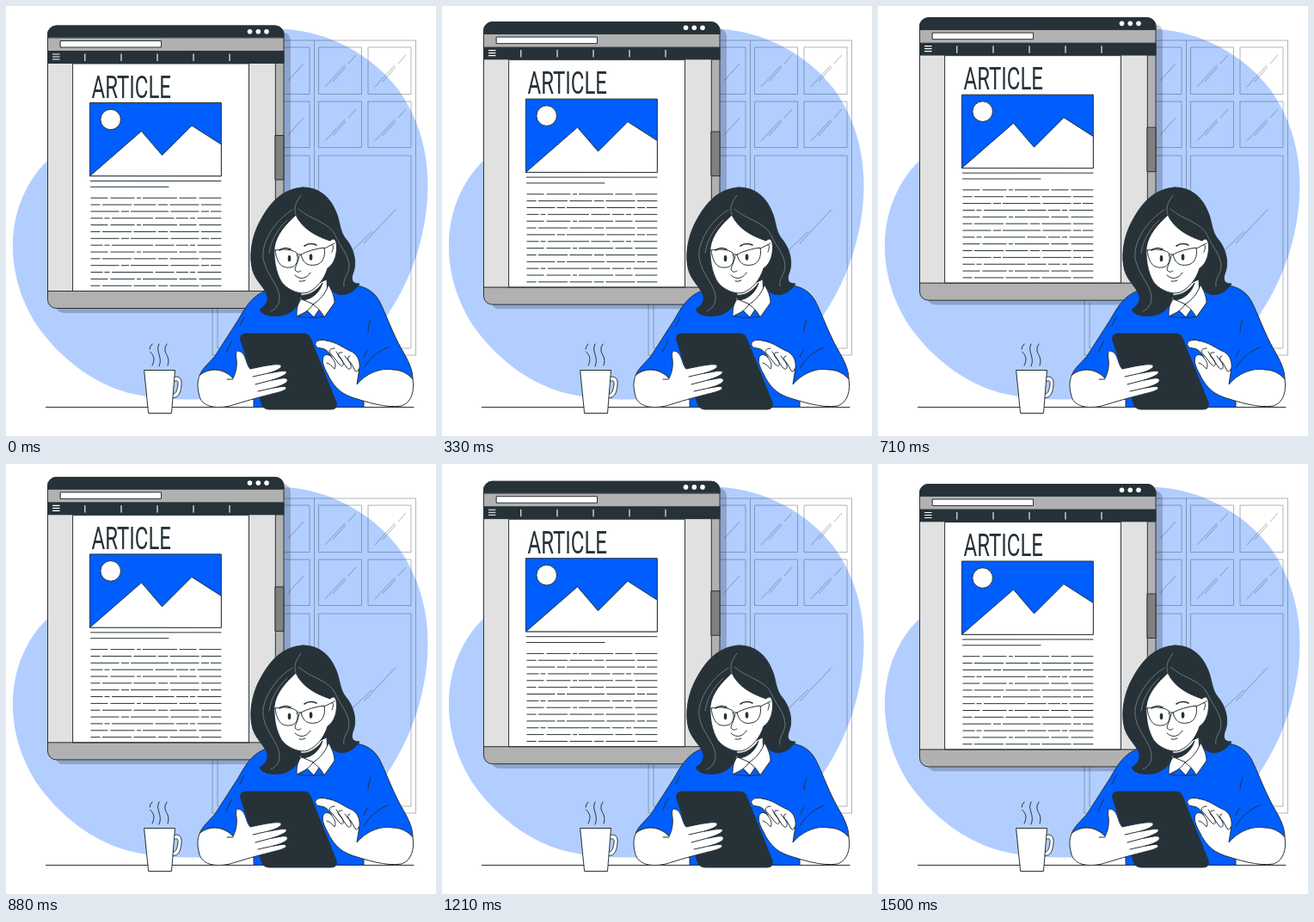
An HTML page that plays this animation: 500 by 500 pixels, repeating every 1.54 s.

```html
<!DOCTYPE html>
<html lang="en">
<head>
<meta charset="utf-8">
<title>Reading an article</title>
<style>
  html, body { margin: 0; width: 100%; height: 100%; overflow: hidden; background: #fff; }
  svg { display: block; width: 100vw; height: 100vh; }
  .ink { stroke: #263238; stroke-width: 1; stroke-linecap: round; stroke-linejoin: round; }
  .none { fill: none; }
  .white { fill: #fff; }
  .blue { fill: #005eff; }
  .dark { fill: #263238; }
  .bar { fill: #b1b1b1; }
  .side { fill: #e1e1e1; }
  .pane { fill: none; stroke: #263238; stroke-width: .6; opacity: .6; }
  .strand { fill: none; stroke: #8b9296; stroke-width: .7; stroke-linecap: round; }
  .title { font: 400 37.5px Roboto, "Open Sans", sans-serif; fill: #263238; }
</style>
</head>
<body>
<svg viewBox="0 0 500 500">
  <path fill="#b2ceff" d="M8 275C9 236 25 202 48 180C90 145 125 130 165 100C210 55 265 26 325 27C375 30 425 56 456 97C480 130 490.500 170 490.500 207C490.500 262 473 315 445 357L400 440L245 457C208 458.500 178 457.500 150 451.500C103 442 61 408 35 370C17 341 7 309 8 275Z"/>

  <g class="pane">
    <path d="M240 40H476.500V406H240ZM358.500 40V406M246 345V398H353V174H300M300 48H353V102.500H300M300 111H353V164.500H300"/>
    <path d="M363.500 48H413.500V102.500H363.500ZM421 48H471V102.500H421ZM363.500 111H413.500V164.500H363.500ZM421 111H471V164.500H421ZM363.500 174H471V398H363.500Z"/>
    <path id="glints"/>
    <path d="M403 284L426 262M416 276L453 236.500M328 87L346 67M328 150L346 130"/>
  </g>

  <g id="browser">
    <rect x="57" y="30" width="274" height="327" rx="10" fill="#000" opacity=".2"/>
    <rect class="ink bar" x="48.500" y="23" width="274.500" height="328.500" rx="10"/>
    <path class="ink dark" d="M48.500 36.500V33A10 10 0 0 1 58.500 23H313A10 10 0 0 1 323 33V36.500Z"/>
    <g class="white">
      <circle cx="283.500" cy="29.700" r="2.800"/><circle cx="293.300" cy="29.700" r="2.800"/><circle cx="303" cy="29.700" r="2.800"/>
    </g>
    <rect class="ink white" x="63.500" y="40.500" width="117" height="7.500"/>
    <rect class="ink dark" x="48.500" y="52.500" width="274.500" height="14"/>
    <path stroke="#fff" stroke-width="1.100" d="M54 56H62.500M54 59H62.500M54 62H62.500M91.800 55.500V64M134 55.500V64M176 55.500V64M218 55.500V64M260 55.500V64"/>
    <path class="side" d="M49 67H78V331H49ZM283 67H313V331H283Z"/>
    <path class="ink white" d="M78 67H282.500V331.500H78Z"/>
    <path class="ink none" d="M48.500 331.500H323M313.300 67V331.500"/>
    <rect class="ink" fill="#808080" x="313.300" y="150.500" width="9.700" height="51.500"/>
    <text class="title" transform="translate(99.500 106.800) scale(.64 1)">ARTICLE</text>
    <rect class="ink blue" x="97.800" y="112.500" width="152.500" height="85"/>
    <path class="ink white" d="M97.800 197.500L157.500 145.500L181.500 173.500L216 139L250.300 161V197.500Z"/>
    <circle class="ink white" cx="121.700" cy="132" r="11.800"/>
    <path class="ink none" d="M98.500 203.500H250M98.500 210.300H189"/>
    <g id="copy" class="none" stroke="#263238"></g>
  </g>

  <path class="ink none" d="M46.500 466.500H474"/>

  <g class="ink">
    <path class="white" d="M194 432C201 429 205 433 204 441C203 451 200 456 193 455.500L193.500 451C198 451 199 447 200 440C200.500 435 198 435 194 437Z"/>
    <path class="white" d="M161 423.500H196.500L192.500 473.500H166Z"/>
    <path class="none" d="M170 393Q167 396 167 399M167.500 402C173 407 173 412 170 418M178 393C173 402 183 408 178 419M187 393Q184 397 185 401C186 406 191 409 188 418"/>
  </g>

  <g class="ink">
    <path class="blue" d="M300 332C286 338 279 349 270 365L243 407C236 415 227 423 225.500 429C237 420 253 421 264 433L288 458V466.500H416V440L473 434C473 422 467 411 460 399C450 381 444 364 437 349C431 335 423 328 408 325L376 322H318Z"/>
    <path class="none" d="M424 365C422 371 421 374 421 379M444 397C431 402 423 410 416 421M421 399L416 408M263 389L256 403M277 362L272 372"/>
  </g>

  <g class="ink">
    <path class="dark" d="M345 211C318 213 304 233 293 255C286 270 282 291 287 308C291 321 302 328 304 338C305 346 299 350 295 353C299 361 311 361 320 360C330 358 337 352 341 345L376 325C380 334 387 337 395 335C403 333 408 328 411 323C403 323 401 319 403 312C409 298 404 282 396 272C387 262 389 250 383 238C376 221 363 211 345 211Z"/>
    <path class="white" d="M343 333L341 345L358 362L374 338L373 318Z"/>
    <path class="dark" d="M342 336C351 338 362 331 368 322C365 333 355 342 344 342Z"/>
    <path class="white" d="M343 341C338 348 338 354 338 361C345 357 351 356 357 347Z"/>
    <path class="white" d="M375 324C379 331 382 338 382 345L370 362C366 354 362 351 357 347C365 342 372 334 375 324Z"/>
    <path class="none" d="M340 361C351 363 361 363 370 361"/>
    <path class="white" d="M337 243C325 254 314 266 312 281C311 299 316 317 323 324C330 331 342 336 351 333C361 329 370 318 374 305C382 300 386 287 384 275C382 268 378 272 377 273C362 268 345 260 337 243Z"/>
    <path class="none" d="M379 278C381 277 381 281 379 286M341 290C340 299 334 306 337 308C339 310 341 309 343 308"/>
    <path class="none" d="M336 313C342 319 350 317 354 310M341 320Q345 321 348 319"/>
    <path class="none" stroke-width="1.600" d="M318 284C322 281 327 281 331 283M347 279C351 276 356 276 361 278"/>
    <path class="none" d="M313 284C322 282 333 283 338 287C341 295 338 304 330 304C320 305 315 299 313 284ZM343 289C350 285 361 282 370 281C372 291 368 300 360 301C350 303 345 298 343 289ZM338 290Q341 287 343 290M370 282L382 276"/>
    <g class="dark" stroke="none">
      <ellipse cx="329.500" cy="293.500" rx="1.800" ry="3.800"/><ellipse cx="354.500" cy="292" rx="1.800" ry="3.800"/>
    </g>
  </g>
  <path class="strand" d="M343 220C337 228 334 235 337 243M333 237C315 248 302 267 299 285C297 305 313 319 317 333C320 344 316 351 308 355M340 236C354 249 376 251 383 267C389 281 399 289 399 304C398 313 391 318 393 326M327 249C315 260 308 273 306 287"/>

  <path class="ink dark" d="M279 381H346Q352 381 354 386L384 461Q386 469 378 469H306Q299 469 297 462L273 389Q271 381 279 381Z"/>

  <g class="ink">
    <path class="white" d="M225.500 429C222 436 222.500 444 224.500 452C227 467 247 470 267 463C283 458 298 454 310 451C318 449 326 447 326 444C325 441 319 443 311 444C323 441 329 437 327 434C325 431 317 434 309 435C319 432 328 428 326 425C324 423 313 426 305 427C315 424 321 421 320 418C318 415 302 418 284 422C279 417 279 405 273 402C267 399 267 404 268 411C269 420 267 427 264 433C253 421 237 420 225.500 429Z"/>
    <path class="none" d="M305 427L287 431M309 435L290 440M311 444L293 448M257 434H264"/>
    <path class="white" d="M360 395C358 390 365 387 372 389C385 391 391 397 400 401C408 404 412 412 411 421L408 440C418 428 435 420 450 423C460 423 468 428 473 434C475 447 472 461 460 465C441 468 418 460 402 455C388 450 380 441 374 428C369 419 367 413 369 408C371 404 376 405 379 409C376 402 371 398 366 398Q362 398 360 395Z"/>
    <path class="none" d="M379 409C383 414 384 418 382 422C379 418 376 416 373 415M382 398C376 398 374 402 379 406L387 416C391 421 394 418 391 412L384 402M391 403C386 402 384 406 389 410L396 420C400 425 403 421 400 415L394 407M400 407C396 408 397 411 401 415L406 424Q409 427 410 422"/>
  </g>
</svg>
<script>
  const $ = id => document.getElementById(id);

  // Reflections on the four small panes
  $('glints').setAttribute('d', [[363, 48], [421, 48], [363, 111], [421, 111]]
    .map(([x, y]) => `M${x + 8} ${y + 46}l23 -25M${x + 17} ${y + 40}l15 -17M${x + 35} ${y + 19}l9 -10`)
    .join(''));

  // Body copy: broken rules with a few repeating rhythms
  const rhythms = ['20 3 28 2.5 5 2 40 2.5', '11 2.5 34 2.5 26 2.5', '33 2.5 9 2 44 2.5', '14 2 6 2.5 48 2.5 22 2.5'];
  for (let i = 0; i < 14; i++) {
    const line = document.createElementNS('http://www.w3.org/2000/svg', 'path');
    line.setAttribute('d', `M98.5 ${223.2 + i * 7.85}H250.3`);
    line.setAttribute('stroke-dasharray', rhythms[i % rhythms.length]);
    $('copy').append(line);
  }

  // Floating window: [step, lift], drawn at 24 steps per second
  const LOOP = 1540, STEPS = 37;
  const path = [[0, 0], [8, -4.4], [14, -7.7], [17.5, -9.6], [21, -7.6], [26, -4.5], [32, -1.1], [36, .5]];
  const lift = k => {
    const i = Math.max(1, path.findIndex(p => p[0] >= k));
    const [a, y0] = path[i - 1], [b, y1] = path[i];
    return y0 + (y1 - y0) * (k - a) / (b - a);
  };
  const frames = Array.from({ length: STEPS }, (_, k) => ({
    offset: Math.round(k * 100 / 24) * 10 / LOOP,
    transform: `translateY(${lift(k).toFixed(2)}px)`,
    easing: 'step-end'
  }));
  frames.push({ offset: 1, transform: frames[0].transform });
  $('browser').animate(frames, { duration: LOOP, iterations: Infinity });
</script>
</body>
</html>
```
